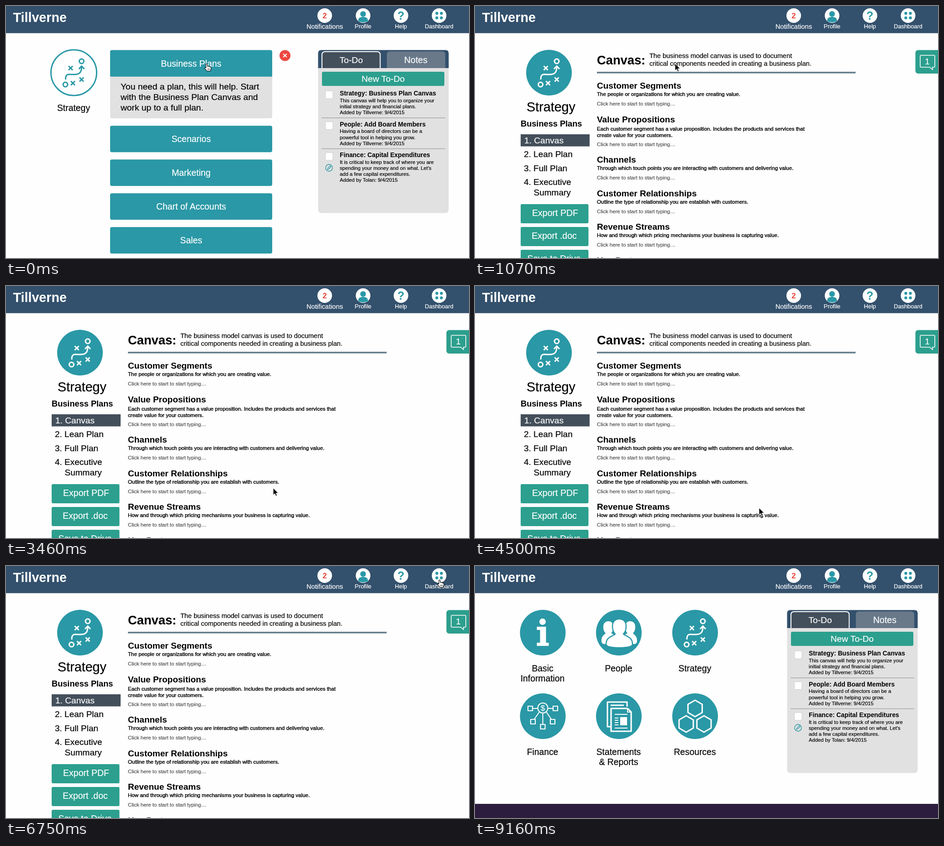
An HTML page that plays this animation: 1014x552 px, repeating every 9.76 s.

```html
<!DOCTYPE html>
<html lang="en">
<head>
<meta charset="utf-8">
<title>Business planning walkthrough</title>
<style>
  html, body { margin: 0; width: 100%; height: 100%; overflow: hidden; background: #fefefe; }
  svg { display: block; width: 100%; height: 100%; }
  text { font-family: "Liberation Sans", Arial, sans-serif; }
</style>
</head>
<body>
<svg id="stage" viewBox="0 0 1014 552"></svg>
<script>
const LOOP = 9760;
const TEAL = '#2a98a6', GREEN = '#2c9f8e', NAVY = '#33506c', SLATE = '#434f5b', PALE = '#e1e1e1';
const BRAND = 'Tillverne';

// Drawing helpers
const text = (x, y, size, str, { fill = '#000', anchor = 'start', weight = 400, edge = .2 } = {}) =>
  `<text x="${x}" y="${y}" font-size="${size}" fill="${fill}" stroke="${fill}" stroke-width="${edge}"
    text-anchor="${anchor}" font-weight="${weight}">${str}</text>`;
const label = (x, y, size, str, fill = '#000') => text(x, y, size, str, { fill, anchor: 'middle' });
const bold = (x, y, size, str, fill) => text(x, y, size, str, { fill, weight: 700, edge: 0 });
const rect = (x, y, w, h, fill, r = 0, extra = '') =>
  `<rect x="${x}" y="${y}" width="${w}" height="${h}" rx="${r}" fill="${fill}" ${extra}/>`;
const circle = (x, y, r, fill, extra = '') => `<circle cx="${x}" cy="${y}" r="${r}" fill="${fill}" ${extra}/>`;
const line = (d, color, width, fill = 'none') =>
  `<path d="${d}" fill="${fill}" stroke="${color}" stroke-width="${width}" stroke-linejoin="round"/>`;
const shape = (d, fill) => `<path d="${d}" fill="${fill}"/>`;
const at = (x, y, content) => `<g transform="translate(${x} ${y})">${content}</g>`;
const cross = (x, y, r) => `M${x - r} ${y - r}l${2 * r} ${2 * r}M${x + r} ${y - r}l${-2 * r} ${2 * r}`;
const box = (x, y, w, h) => `M${x} ${y}h${w}v${h}h${-w}z`;

// Icons, centred on 0,0
const strategyIcon = color =>
  line('M-18 15C-18 -1 -9 5 1 4C13 4 17 -1 17 -13M11 -8L17 -14.5L23 -8', color, 3) +
  line(cross(-7, -10, 4.5) + cross(-2, 23, 4.5) + cross(17, 15, 4.5), color, 3) +
  circle(17, -25, 5, 'none', `stroke="${color}" stroke-width="3"`) +
  circle(-18.5, 26, 5, 'none', `stroke="${color}" stroke-width="3"`);

const infoIcon = circle(-.5, -24, 7, '#fff') + shape('M-13 -13H7V22H13V29H-13V22H-6V-6H-13Z', '#fff');

const sidePerson = shape('M-23 -25C-14 -25 -12 -18 -12 -11C-12 -5 -15 -1 -17 1L-10 5V25H-32Q-38 24 -38 18C-38 6 -31 5 -29 1C-32 -2 -34 -6 -34 -12C-34 -20 -30 -25 -23 -25Z', '#fff');
const peopleIcon = sidePerson + `<g transform="translate(2 0) scale(-1 1)">${sidePerson}</g>` +
  line('M1 -30C10 -30 16 -24 16 -14C16 -6 13 0 10 3C12 7 30 8 30 25Q30 33 1 33Q-28 33 -28 25C-28 8 -10 7 -8 3C-11 0 -14 -6 -14 -14C-14 -24 -8 -30 1 -30Z', TEAL, 2.5, '#fff');

const financeIcon =
  line('M-22 -17H-11M11 -17H22M-7 -10L-19 7M7 -10L19 7M0 -6V17', '#fff', 2) +
  circle(0, -18, 11, 'none', 'stroke="#fff" stroke-width="2"') +
  line([[-32.5, -22], [22.5, -22], [-26.5, 7], [16.5, 7], [-5, 18]].map(([x, y]) => box(x, y, 10, 10)).join(''), '#fff', 2.2) +
  label(0, -12, 17, '$', '#fff');

const reportsIcon =
  line('M-18 23H-25V-31H18V-21M-18 -24H11', '#fff', 3) +
  line('M-17 -17H19L27 -9V33H-17Z', '#fff', 3.2, TEAL) +
  line('M19 -17V-9H27', '#fff', 2) +
  line('M-9 -4H19M-9 4H-1M-9 9H-1M-9 14H-1M-9 19H-1M-9 26H19', '#fff', 1.8) +
  rect(3, 2, 15, 18, '#fff');

const hexagon = (x, y, r) => 'M' + [0, 1, 2, 3, 4, 5].map(i => {
  const a = (i + .5) * Math.PI / 3;
  return `${(x + r * Math.cos(a)).toFixed(2)} ${(y + r * Math.sin(a)).toFixed(2)}`;
}).join('L') + 'Z';
const resourcesIcon = line(hexagon(0, -17, 18) + hexagon(-19.5, 17, 18) + hexagon(19.5, 17, 18), '#fff', 3);

// Shared parts
function header() {
  const white = '#fff';
  const entries = [[698, 14.7, 'Notifications', 50], [782, 12.8, 'Profile', 48.5], [865, 12.8, 'Help', 48.5], [948.5, 12.8, 'Dashboard', 48.5]];
  return rect(0, 0, 1014, 59.5, NAVY) + bold(15.5, 35, 28.7, BRAND, white) +
    entries.map(([x, size, name, y]) => circle(x, 21, 16, white) + label(x, y, size, name, white)).join('') +
    text(698, 27, 17, '2', { fill: '#ea4a41', anchor: 'middle', weight: 700, edge: 0 }) +
    circle(782, 17.5, 6.2, TEAL) + shape('M771.5 33C771 26 775 24 782 24S793 26 792.5 33Q782 39 771.5 33Z', TEAL) +
    text(865, 30, 25, '?', { fill: TEAL, anchor: 'middle', weight: 700, edge: 0 }) +
    [-5, 5].map(dx => [-5, 5].map(dy => circle(948.5 + dx, 21 + dy, 3.2, TEAL)).join('')).join('');
}

function todoPanel() {
  const items = [
    [196, 'Strategy: Business Plan Canvas', ['This canvas will help you to organize your',
      'initial strategy and financial plans.', `Added by ${BRAND}: 9/4/2015`]],
    [263.5, 'People: Add Board Members', ['Having a board of directors can be a',
      'powerful tool in helping you grow.', `Added by ${BRAND}: 9/4/2015`]],
    [331, 'Finance: Capital Expenditures', ['It is critical to keep track of where you are',
      'spending your money and on what. Let’s', 'add a few capital expenditures.', 'Added by Tolan: 9/4/2015']]
  ];
  return rect(683.5, 96.5, 286, 357, PALE, 7) +
    shape('M683.5 136V103.5Q683.5 96.5 690.5 96.5H962.5Q969.5 96.5 969.5 103.5V136Z', NAVY) +
    line('M692 136V107Q692 100 699 100H812.5Q819.5 100 819.5 107V136', '#fff', 2, SLATE) +
    shape('M834 136V106Q834 99.5 841 99.5H955Q962 99.5 962 106V136Z', '#69798a') +
    label(756, 125, 19.2, 'To-Do', '#fff') + label(897.5, 125, 19.5, 'Notes', '#fff') +
    rect(692, 144, 268, 31, GREEN, 3) + label(826, 166, 19.2, 'New To-Do', '#fff') +
    items.map(([y, title, lines], i) =>
      rect(699.5, y - 10, 16.5, 17, '#fff', 3, 'stroke="#cdcdcd"') + bold(731, y, 13.8, title) +
      lines.map((s, n) => text(731, y + 14.8 + n * 13.2, 11.2, s)).join('') +
      (i < 2 ? rect(691, y + 48.3, 271, 1.6, '#acacac') : '')).join('') +
    circle(707.5, 354.5, 7.5, 'none', `stroke="${TEAL}" stroke-width="1.4"`) +
    line('M704 358.5L705 355L710 350L712 352L707 357Z', TEAL, 1.2);
}

// Pages
function strategyPage() {
  const bar = (y, name) => rect(228, y, 355, 58, TEAL, 4) + label(405.5, y + 36, 19.4, name, '#fff');
  const intro = ['You need a plan, this will help. Start', 'with the Business Plan Canvas and', 'work up to a full plan.'];
  return circle(148.5, 146, 50, '#fff', `stroke="${TEAL}" stroke-width="3"`) + at(148.5, 146, strategyIcon(TEAL)) +
    label(148, 230, 19.4, 'Strategy') +
    rect(228, 130, 355, 116, PALE, 4) + bar(96.5, 'Business Plans') + rect(228, 148, 355, 6.5, TEAL) +
    intro.map((s, i) => text(251, 182.5 + i * 23, 19.2, s)).join('') +
    ['Scenarios', 'Marketing', 'Chart of Accounts', 'Sales'].map((s, i) => bar(262.3 + i * 74, s)).join('') +
    circle(611, 108.5, 12, '#ee4641') + line(cross(611, 108.5, 3.8), '#fff', 2) + todoPanel();
}

function canvasPage() {
  const sections = [
    [181, 'Customer Segments', ['The people or organizations for which you are creating value.']],
    [254.5, 'Value Propositions', ['Each customer segment has a value proposition. Includes the products and services that',
      'create value for your customers.']],
    [343, 'Channels', ['Through which touch points you are interacting with customers and delivering value.']],
    [417, 'Customer Relationships', ['Outline the type of relationship you are establish with customers.']],
    [490, 'Revenue Streams', ['How and through which pricing mechanisms your business is capturing value.']],
    [563.5, 'Key Partners', []]
  ];
  const section = ([y, title, lines]) => {
    const gap = lines.length > 1 ? 18 : 16.2;
    return bold(267, y, 19, title) +
      lines.map((s, i) => text(267, y + gap + i * 14.3, 11.6, s, { edge: .4 })).join('') +
      text(267, y + gap + lines.length * 14.3 + 6, 11.4, 'Click here to start to start typing…', { fill: '#4a4a4a' });
  };
  const button = (y, x, name) => rect(100, y, 148.5, 42, GREEN, 3) + label(x, y + 26, 19.5, name, '#fff');
  return circle(162, 146, 50, TEAL) + at(162, 146, strategyIcon('#fff')) +
    label(166.5, 230.5, 28.7, 'Strategy') + bold(100, 264, 18.2, 'Business Plans') +
    rect(100, 281, 151, 26.5, SLATE) + text(108, 301, 19.1, '1. Canvas', { fill: '#fff' }) +
    text(107, 331, 19, '2. Lean Plan') + text(107, 361.5, 19, '3. Full Plan') +
    text(107, 392, 19, '4. Executive') + text(128.5, 415, 19, 'Summary') +
    button(434, 175.5, 'Export PDF') + button(484, 173.5, 'Export .doc') + button(534, 173, 'Save to Drive') +
    bold(267, 128, 27.3, 'Canvas:') +
    text(382, 114, 14.45, 'The business model canvas is used to document') +
    text(382, 131.3, 14.45, 'critical components needed in creating a business plan.') +
    rect(267, 144, 566.5, 3.6, '#677f8c') + sections.map(section).join('') +
    rect(964.5, 96.5, 60, 51.5, GREEN, 6) +
    line('M977 108H1005Q1007 108 1007 110V132Q1007 134 1005 134H1002V139.5L996 134H977Q975 134 975 132V110Q975 108 977 108Z', '#fff', 1.6) +
    label(990.5, 128, 19, '1', '#fff');
}

function dashboardPage() {
  const tiles = [
    [148.5, 146, infoIcon, ['Basic', 'Information']], [315, 146, peopleIcon, ['People']],
    [482, 146, strategyIcon('#fff'), ['Strategy']], [148.5, 329, financeIcon, ['Finance']],
    [315, 329, reportsIcon, ['Statements', '&amp; Reports']], [482, 329, resourcesIcon, ['Resources']]
  ];
  return tiles.map(([x, y, icon, names]) => circle(x, y, 50, TEAL) + at(x, y, icon) +
      names.map((s, i) => label(x - .5, y + 84.5 + i * 22.5, 19.3, s)).join('')).join('') +
    todoPanel() + rect(0, 521, 1014, 31, '#2c1d3e');
}

const arrow = line('M0 0V15.5L3.6 12.2L6 17.5L8.6 16.4L6.2 11.2H11.2Z', '#fff', 1, '#000');
const hand = line('M0 1.5Q1.5 -.5 3 1.5V6Q5 5 6 6.5Q8 6 8.5 7.5Q11 7 11 9.5V12L9.5 16.5H2.5L-3 10.5Q-3 8 0 9.5Z', '#000', 1.1, '#fff') +
  line('M4 11V14M6 11V14M8 11V14', '#000', .8);

const pages = { strategy: strategyPage(), canvas: canvasPage(), dashboard: dashboardPage() };
const stage = document.getElementById('stage');
stage.innerHTML = rect(0, 0, 1014, 552, '#fefefe') +
  Object.entries(pages).map(([id, content]) => `<g id="${id}">${content}</g>`).join('') + header() +
  `<g id="cursor"><g id="arrow">${arrow}</g><g id="hand">${hand}</g></g>`;

const show = (id, on) => document.getElementById(id).setAttribute('display', on ? 'inline' : 'none');

// Pointer moves: start, number of steps, destination, sideways bow of the path
const STEP = 148;
const moves = [
  [1670, 3, 391, 214, 0],
  [3160, 5, 622, 486, 0],
  [6000, 6, 948, 30, 0],
  [8420, 7, 988, 553, -38]
];

// Quick start with a long settling tail, like a hand-moved mouse
function ease(p) {
  const q = 1 - (1 - p) ** 1.5;
  return q * q * (3 - 2 * q);
}

function pointerAt(t) {
  let x = 438, y = 126;
  for (const [start, steps, toX, toY, bow] of moves) {
    if (t < start) break;
    const step = Math.floor((t - start) / STEP) + 1;
    const p = ease(Math.min(step / steps, 1));
    x += (toX - x) * p + bow * Math.sin(Math.PI * p);
    y += (toY - y) * p;
  }
  return [x, y];
}

function draw() {
  const t = performance.now() % LOOP;
  const page = t < 1070 ? 'strategy' : t < 7500 ? 'canvas' : 'dashboard';
  for (const id in pages) show(id, id === page);
  const [x, y] = pointerAt(t);
  const overLink = page === 'strategy' || y < 52;
  show('hand', overLink);
  show('arrow', !overLink);
  show('cursor', t < 9160);
  document.getElementById('cursor').setAttribute('transform', `translate(${x} ${y})`);
  requestAnimationFrame(draw);
}
draw();
</script>
</body>
</html>
```
